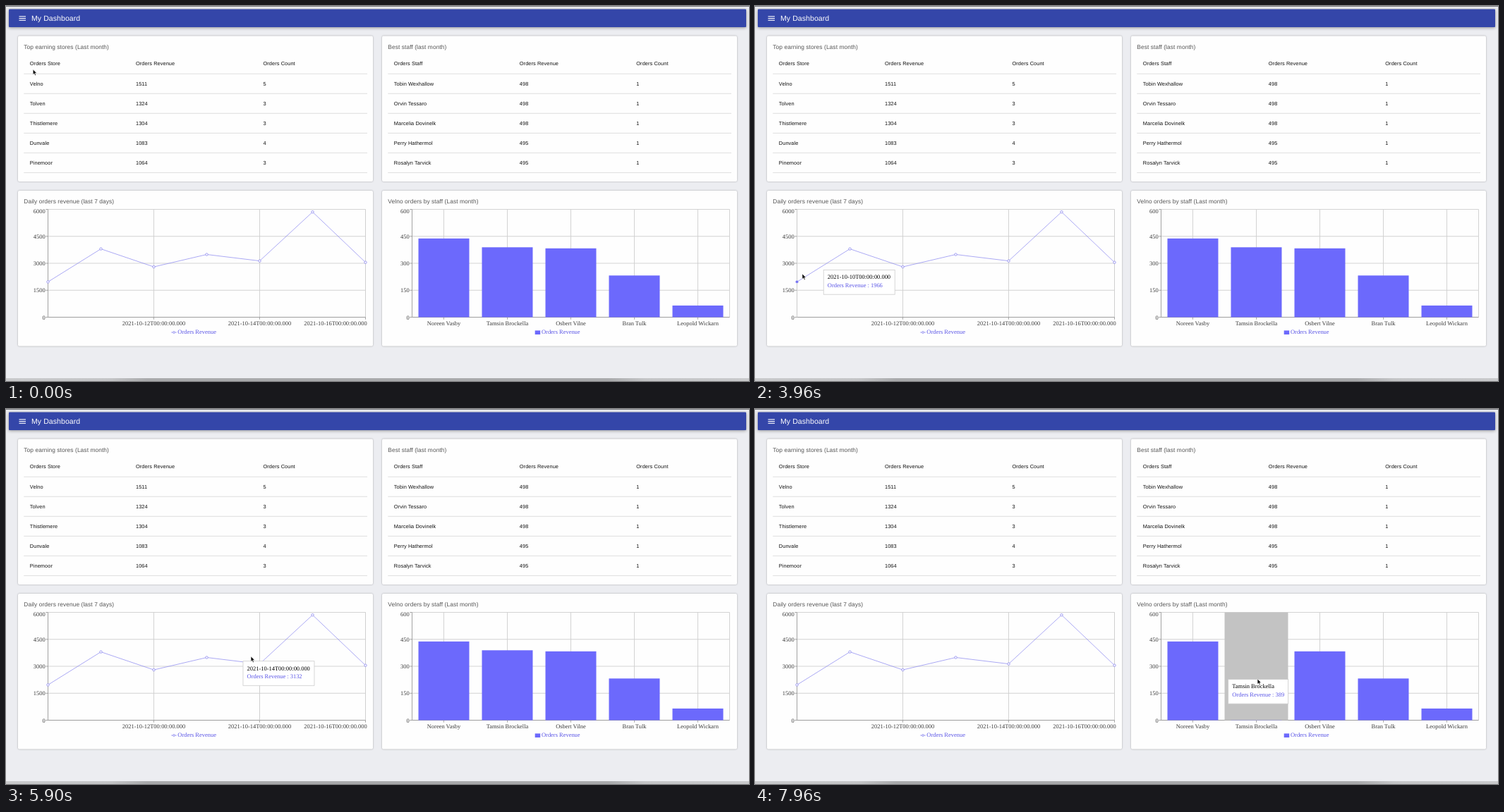
Recreate the animation shown at these times as an HTML page. Size 1053 by 532 pixels, loop 8000 ms.

```html
<!DOCTYPE html>
<html lang="en">
<head>
<meta charset="utf-8">
<title>My Dashboard</title>
<style>
  html, body { margin: 0; width: 100%; height: 100%; overflow: hidden; background: #ecedf1; }
  svg { display: block; width: 1053px; height: 532px; }
  text { font-family: "Liberation Sans", Arial, sans-serif; text-rendering: geometricPrecision; }
  .title { font-size: 8.4px; letter-spacing: .00938em; fill: #555; }
  .cell { font-size: 7.38px; letter-spacing: .0107em; fill: #111; }
  .serif { font-family: "Liberation Serif", Times, serif; font-size: 8.45px; fill: #3c3c3c; }
  .key { fill: #5a55e6; }
  .end { text-anchor: end; }
  .mid { text-anchor: middle; }
  .card { fill: #fefefe; filter: drop-shadow(0 .8px .8px rgba(0,0,0,.32)); }
  .bar { fill: #3446a9; filter: drop-shadow(0 1.5px 2px rgba(0,0,0,.38)); }
  .rule { stroke: #dcdcdc; stroke-width: .9; }
  .grid { stroke: #cfcfcf; stroke-width: .9; }
  .axis { stroke: #999; stroke-width: .9; }
  .fill { fill: #6c69fc; }
  .line { fill: none; stroke: #8f8cf0; stroke-width: .75; }
  .dot { fill: #fff; stroke: #817ded; stroke-width: .75; }
  .box { fill: #fff; stroke: #ccc; stroke-width: .8; }
</style>
</head>
<body>
<svg id="stage" viewBox="0 0 1053 532">
  <defs>
    <linearGradient id="dock">
      <stop offset="0" stop-color="#c9cacc"/>
      <stop offset=".14" stop-color="#c4c5c7"/>
      <stop offset=".19" stop-color="#a9aaac"/>
      <stop offset=".81" stop-color="#a9aaac"/>
      <stop offset=".86" stop-color="#c4c5c7"/>
      <stop offset="1" stop-color="#c9cacc"/>
    </linearGradient>
  </defs>
</svg>
<script>
const LOOP = 8000, TOP = 288.5, BOTTOM = 441.5, GAP = 5.2;
const stage = document.getElementById('stage');

function add(tag, attrs, parent = stage) {
  const el = document.createElementNS('http://www.w3.org/2000/svg', tag);
  for (const k in attrs) el.setAttribute(k, attrs[k]);
  return parent.appendChild(el);
}
function label(x, y, str, cls, parent) {
  const el = add('text', { x, y, class: cls }, parent);
  el.textContent = str;
  return el;
}
const seg = (x1, y1, x2, y2, cls, parent) => add('line', { x1, y1, x2, y2, class: cls }, parent);
const rect = (x, y, width, height, cls, parent) => add('rect', { x, y, width, height, class: cls }, parent);

function card(x, y, h, title) {
  rect(x, y, 503, h, 'card').setAttribute('rx', 2);
  label(x + 8.3, y + 18, title, 'title');
}

function table(x, title, cols, rows) {
  card(x, 42.5, 206.5, title);
  rows.forEach((row, r) => {
    row.forEach((str, c) => label(cols[c], r ? 84.6 + r * 28.1 : 84, str, 'cell'));
    const y = 96.2 + r * 28.05;
    seg(x + 8.3, y, x + 495, y, 'rule');
  });
}

function frame(left, max, ticksX) {
  const right = left + 450;
  for (let i = 0; i <= 4; i++) {
    const y = BOTTOM - i * 38.25;
    seg(left, y, right, y, 'grid');
    seg(left - 3.2, y, left, y, 'axis');
    label(left - 3.8, y + (i == 4 ? 5 : 3.2), max * i / 4, 'serif end');
  }
  for (const x of [...ticksX, right]) seg(x, TOP, x, BOTTOM, 'grid');
  for (const x of ticksX) seg(x, BOTTOM, x, BOTTOM + 3.2, 'axis');
  seg(left, TOP, left, BOTTOM, 'axis');
  seg(left, BOTTOM, right, BOTTOM, 'axis');
}

function tooltip(w) {
  const g = add('g', {});
  rect(0, 0, w, 34.6, 'box', g);
  const name = label(5.6, 12.9, '', 'serif', g);
  name.style.fill = '#000';
  return { g, name, value: label(5.6, 24.7, '', 'serif key', g) };
}

// Page chrome
rect(0, 0, 1053, 1, '').setAttribute('fill', '#77787c');
rect(4, 4.5, 1045, 25.5, 'bar').setAttribute('rx', 1);
for (const y of [14.3, 17, 19.7]) rect(18.5, y, 9.5, 1.1, '').setAttribute('fill', '#fff');
const heading = label(36, 21.1, 'My Dashboard', '');
heading.setAttribute('style', 'font-size:10.5px;letter-spacing:.0075em;fill:#fff');
rect(0, 528, 1053, 4, '').setAttribute('fill', 'url(#dock)');

table(17, 'Top earning stores (Last month)', [33.8, 184, 364.5], [
  ['Orders Store', 'Orders Revenue', 'Orders Count'],
  ['Velno', 1511, 5],
  ['Tolven', 1324, 3],
  ['Thistlemere', 1304, 3],
  ['Dunvale', 1083, 4],
  ['Pinemoor', 1064, 3]
]);
table(533, 'Best staff (last month)', [549.8, 727.8, 893.3], [
  ['Orders Staff', 'Orders Revenue', 'Orders Count'],
  ['Tobin Wexhallow', 498, 1],
  ['Orvin Tessaro', 498, 1],
  ['Marcelia Dovinelk', 498, 1],
  ['Perry Hathermol', 495, 1],
  ['Rosalyn Tarvick', 495, 1]
]);

// Line chart
const days = {
  left: 59.5, w: 101, values: [1966, 3800, 2802, 3490, 3132, 5855, 3051],
  name: i => `2021-10-${10 + i}T00:00:00.000`,
  x: i => 59.5 + i * 75,
  pick: x => Math.round((x - 59.5) / 75)
};
card(17, 262, 220.5, 'Daily orders revenue (last 7 days)');
frame(59.5, 6000, [209.5, 359.5, 509.5]);
[209.5, 359.5, 467].forEach((x, i) => label(x, 452.8, days.name(2 + 2 * i), 'serif mid'));
const dayY = i => BOTTOM - days.values[i] * 153 / 6000;
const dayGuide = seg(0, TOP, 0, BOTTOM, 'grid');
add('polyline', { points: days.values.map((v, i) => [days.x(i), dayY(i)]).join(' '), class: 'line' });
days.values.forEach((v, i) => add('circle', { cx: days.x(i), cy: dayY(i), r: 1.7, class: 'dot' }));
const activeDot = add('circle', { r: 2, fill: '#6c69f0', stroke: '#fff', 'stroke-width': .5 });
seg(234, 463, 242, 463, 'line');
add('circle', { cx: 238, cy: 463, r: 1.4, class: 'dot' });
label(243.3, 465.4, 'Orders Revenue', 'serif key');

// Bar chart
const people = ['Noreen Vasby', 'Tamsin Brockella', 'Osbert Vilne', 'Bran Tulk', 'Leopold Wickarn'];
const staff = {
  left: 575.5, w: 85, values: [438, 389, 383, 232, 65],
  name: i => people[i],
  x: i => 620.5 + i * 90,
  pick: x => Math.min(4, Math.floor((x - 575.5) / 90))
};
card(533, 262, 220.5, 'Velno orders by staff (Last month)');
frame(575.5, 600, people.map((p, i) => staff.x(i)));
staff.values.forEach((v, i) => {
  const h = v * .255;
  rect(staff.x(i) - 36, BOTTOM - h, 72, h, 'fill');
  label(staff.x(i), 452.8, people[i], 'serif mid');
});
const barShade = rect(0, TOP, 90, BOTTOM - TOP, '');
barShade.setAttribute('fill', '#c3c3c3');
rect(749.7, 460.4, 7.5, 5.6, 'fill');
label(759, 465.4, 'Orders Revenue', 'serif key');

days.tip = tooltip(days.w);
staff.tip = tooltip(staff.w);
const pointer = add('path', {
  d: 'M0 0V7.2L1.7 5.7L2.9 8.4L4.1 7.9L2.9 5.2H5.2Z',
  fill: '#000', stroke: '#fff', 'stroke-width': .5
});

// Pointer path: time, x, y
const path = [
  [0, 38, 90], [1800, 552, 86], [3830, 97, 373], [3960, 67, 380], [4350, 70, 378],
  [4920, 172, 361.5], [5100, 246, 361], [5755, 322, 352.5], [5900, 347, 351],
  [6770, 472, 346], [7060, 492, 349], [7300, 500, 352], [7843, 665.5, 380], [7960, 712, 383],
  [8000, 716, 384]
];
function mouse(t) {
  const i = Math.max(1, path.findIndex(p => p[0] >= t));
  const [a, b] = [path[i - 1], path[i]];
  const k = (t - a[0]) / (b[0] - a[0]);
  return { x: a[1] + (b[1] - a[1]) * k, y: a[2] + (b[2] - a[2]) * k };
}

const inside = (c, m) => m.x >= c.left && m.x <= c.left + 450 && m.y >= TOP && m.y <= BOTTOM;
function goal(c, m) {
  const px = c.x(c.pick(m.x));
  const flip = px + GAP + c.w > c.left + 450;
  return { x: flip ? px - GAP - c.w : px + GAP, y: m.y + GAP };
}

// The tooltip trails its goal with a 400 ms ease
function trail(c, t, m) {
  const n = 60, sum = { x: 0, y: 0 };
  for (let i = 0; i < n; i++) {
    const p = (i + .5) / n;
    const past = mouse(Math.max(0, t - 400 * (.08 + .42 * p + .4 * p ** 6)));
    const g = goal(c, inside(c, past) ? past : m);
    sum.x += g.x / n;
    sum.y += g.y / n;
  }
  return sum;
}

const show = (el, on) => el.setAttribute('visibility', on ? 'visible' : 'hidden');
const place = (el, p) => el.setAttribute('transform', `translate(${p.x.toFixed(2)} ${p.y.toFixed(2)})`);

function hover(c, t, m) {
  const on = inside(c, m);
  show(c.tip.g, on);
  if (!on) return -1;
  const i = c.pick(m.x);
  c.tip.name.textContent = c.name(i);
  c.tip.value.textContent = 'Orders Revenue : ' + c.values[i];
  place(c.tip.g, trail(c, t, m));
  return i;
}

function draw() {
  const t = performance.now() % LOOP, m = mouse(t);
  place(pointer, m);
  const d = hover(days, t, m), s = hover(staff, t, m);
  show(activeDot, d >= 0);
  show(dayGuide, d >= 0);
  show(barShade, s >= 0);
  if (d >= 0) {
    place(activeDot, { x: days.x(d), y: dayY(d) });
    place(dayGuide, { x: days.x(d), y: 0 });
  }
  if (s >= 0) barShade.setAttribute('x', staff.x(s) - 45);
  requestAnimationFrame(draw);
}
draw();
</script>
</body>
</html>
```
